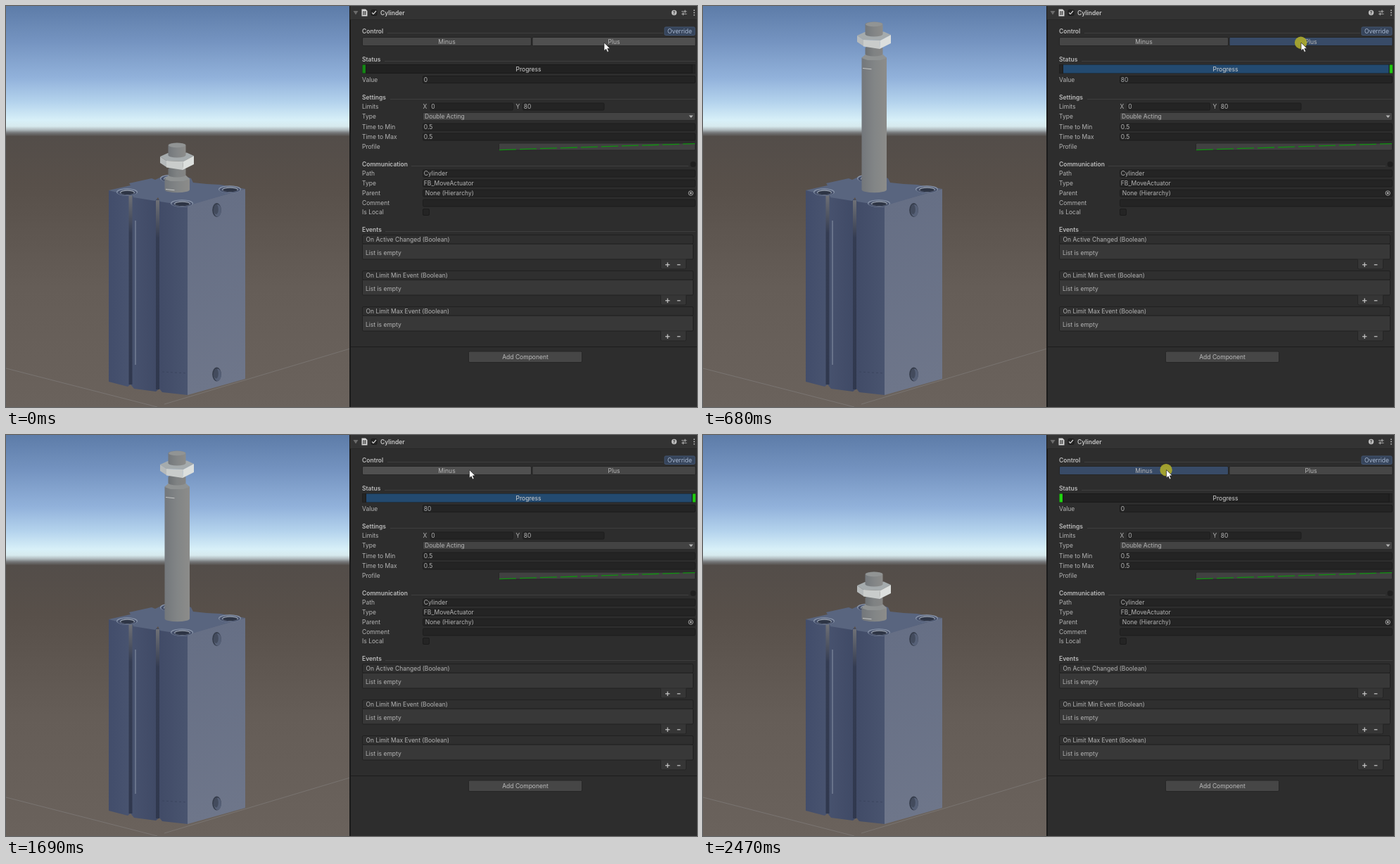
An HTML page with a canvas that plays this animation: 982x570 px, repeating every 2.54 s.

```html
<!DOCTYPE html>
<html lang="en">
<head>
<meta charset="utf-8">
<title>Cylinder inspector</title>
<style>
html, body { margin: 0; width: 100%; height: 100%; overflow: hidden; background: #2d2d2d; }
canvas { display: block; width: 982px; height: 570px; }
</style>
</head>
<body>
<canvas id="stage" width="982" height="570"></canvas>
<script>
const ctx = document.getElementById('stage').getContext('2d');
const LOOP = 2540;
const FONT = 'Inter, Roboto, sans-serif';
const UP = [0, 12.8, 22.4, 32, 44.8, 54.4, 64, 76.8, 80];
const DOWN = [76.8, 64, 54.39999, 44.79999, 31.99999, 22.39999, 12.79999, 0, 0];
const PX_PER_UNIT = 2.15;

// ---- helpers ----
function rect(x, y, w, h, fill) {
  ctx.fillStyle = fill;
  ctx.fillRect(x, y, w, h);
}

function box(x, y, w, h, fill, stroke, r = 1.5) {
  ctx.beginPath();
  ctx.roundRect(x + .5, y + .5, w - 1, h - 1, r);
  ctx.fillStyle = fill;
  ctx.fill();
  if (stroke) {
    ctx.strokeStyle = stroke;
    ctx.lineWidth = 1;
    ctx.stroke();
  }
}

function poly(points, fill) {
  ctx.beginPath();
  for (let i = 0; i < points.length; i += 2) ctx.lineTo(points[i], points[i + 1]);
  ctx.closePath();
  ctx.fillStyle = fill;
  ctx.fill();
}

function oval(x, y, rx, ry, fill) {
  ctx.beginPath();
  ctx.ellipse(x, y, rx, ry, 0, 0, 7);
  ctx.fillStyle = fill;
  ctx.fill();
}

function line(x1, y1, x2, y2, color, width = 1) {
  ctx.beginPath();
  ctx.moveTo(x1, y1);
  ctx.lineTo(x2, y2);
  ctx.strokeStyle = color;
  ctx.lineWidth = width;
  ctx.stroke();
}

function gradient(x1, y1, x2, y2, ...stops) {
  const g = ctx.createLinearGradient(x1, y1, x2, y2);
  for (const [at, color] of stops) g.addColorStop(at, color);
  return g;
}

function text(str, x, y, color = '#b4b4b4', align = 'left', weight = 400) {
  ctx.font = `${weight} 8.5px ${FONT}`;
  ctx.textAlign = align;
  ctx.fillStyle = color;
  ctx.fillText(str, x, y + 3.1);
}

// ---- 3D view ----
function drawBackdrop() {
  rect(0, 0, 489, 570, gradient(0, 0, 0, 570,
    [0, '#5d7ca8'], [.09, '#7594c1'], [.18, '#92b2db'], [.24, '#b4d3ed'],
    [.285, '#d8f0f8'], [.3, '#d7eaee'], [.309, '#aeb8bc'], [.316, '#76787a'], [.325, '#534d49'],
    [.45, '#58504a'], [.7, '#655d57'], [1, '#6a625c']));
  line(0, 515, 215, 570, 'rgba(170,175,180,.3)', .8);
  line(225, 566, 489, 487, 'rgba(170,175,180,.3)', .8);
}

function cornerHole(x, y, rx) {
  oval(x, y, rx, 5.2, '#8793a8');
  oval(x, y + .6, rx - 1.3, 4.4, '#46506a');
  oval(x + .5, y + .4, rx - 4.5, 3.5, '#a3acb8');
  oval(x + .5, y + 1, rx - 5.5, 2.8, '#2e3545');
}

function sideHole(y) {
  oval(299.5, y, 6.3, 10, '#363d4c');
  oval(300.6, y + .8, 5.2, 8.8, '#566077');
  oval(298.6, y - 1, 3.2, 7, '#434b5d');
}

function drawBlock() {
  poly([146, 262, 258, 283, 258, 553, 222, 549, 218, 544, 213, 548, 182, 544, 177, 538, 173, 541, 146, 534],
    gradient(146, 0, 258, 0, [0, '#424d6b'], [.25, '#48536f'], [.6, '#404a66'], [1, '#49546f']));
  poly([258, 283, 340, 260, 340, 530, 258, 553],
    gradient(258, 283, 340, 530, [0, '#666f85'], [1, '#6e768a']));
  poly([146, 262, 177, 255, 175, 252, 207, 245, 212, 247, 225, 241, 250, 240, 263, 245,
    266, 251, 285, 253, 304, 254, 340, 260, 258, 284, 219, 278, 216, 272, 212, 277,
    181, 272, 179, 266, 174, 269], '#59657f');

  for (const [x, y] of [[174.5, 269], [213, 276]]) {
    const bottom = y + 269;
    rect(x, y, 5, bottom - y, gradient(0, y, 0, bottom,
      [0, '#6e7076'], [.07, '#5a5e69'], [.2, '#343c52'], [1, '#30384e']));
  }
  line(184, 305, 184, 510, '#929cae', .9);
  ctx.setLineDash([3, 3]);
  line(222, 520, 257, 522, '#374159', .7);
  ctx.setLineDash([]);

  cornerHole(232, 245, 13);
  cornerHole(172, 264.5, 15);
  cornerHole(318, 260.5, 16);
  cornerHole(250, 280.5, 16);
  sideHole(290);
  sideHole(523.5);
}

function shaft(x1, x2, top, bottom, ry, shades) {
  const c = (x1 + x2) / 2, r = (x2 - x1) / 2;
  ctx.beginPath();
  ctx.moveTo(x1, top);
  ctx.lineTo(x1, bottom);
  ctx.ellipse(c, bottom, r, ry, 0, Math.PI, 0, true);
  ctx.lineTo(x2, top);
  ctx.ellipse(c, top, r, ry, 0, 0, Math.PI, true);
  ctx.fillStyle = gradient(x1, 0, x2, 0, [0, shades[0]], [.5, shades[1]], [1, shades[2]]);
  ctx.fill();
}

function drawRod(value) {
  const lift = -value * PX_PER_UNIT;
  const steel = ['#73777b', '#828586', '#8c8c8a'];
  shaft(225.5, 261, 246 + lift, 261, 4.3, steel);
  ctx.save();
  ctx.translate(0, lift);
  poly([225.5, 246, 231, 240.5, 255.5, 240.5, 261, 246, 252, 249, 234, 249], '#8f9292');
  shaft(230.5, 255.5, 232, 240, 3.4, ['#6c7073', '#7f8283', '#858584']);
  line(227, 260.5, 239.5, 261.8, '#c7c9c8', 1);

  poly([219, 214, 230, 209, 257, 208.5, 267, 213, 252, 221, 228, 220], '#a5abad');
  poly([219, 214, 228, 220, 228, 229, 219, 223], '#b6babb');
  poly([228, 220, 252, 221, 251, 233, 228, 229.5], '#c9cccb');
  poly([252, 221, 267, 213, 267, 225, 251, 233], '#dcdfdd');
  shaft(230.5, 255.5, 198, 212, 3.4, steel);
  oval(243, 198, 12, 3.2, '#919494');
  ctx.restore();
}

// ---- inspector ----
function field(x, y, w, value, color) {
  box(x, y - 5.5, w, 11, '#242424', '#1d1d1d');
  if (value !== undefined) text(value, x + 1.8, y, color);
}

function heading(label, y, lineStart, lineEnd = 980) {
  const lineY = Math.floor(y + 2.5) + .5;
  text(label, 506, y, '#bcbcbc', 'left', 600);
  line(lineStart, lineY, lineEnd, lineY, '#3e3e3e');
}

function button(x, w, label, hover, pressed) {
  box(x, 44, w, 13, pressed ? '#384b67' : hover ? '#505050' : '#464646', '#252525');
  text(label, x + w / 2, 50.5, '#b8b8b8', 'center');
}

function drawHeader() {
  rect(489, 0, 493, 19, '#333333');
  line(489, 19.5, 982, 19.5, '#272727');
  poly([493.5, 7, 500.5, 7, 497, 12.5], '#6b6b6b');
  poly([505.5, 4.5, 511, 4.5, 513.5, 7, 513.5, 14.5, 505.5, 14.5], '#d2d2d2');
  for (const d of [0, 2.5]) {
    line(508.3 + d, 7, 507.7 + d, 13, '#333', .8);
    line(507, 8.8 + d, 512, 8.8 + d, '#333', .8);
  }
  box(518.5, 5, 9, 9, '#242424', '#1a1a1a');
  line(520.2, 9.5, 522.2, 11.6, '#d5d5d5', 1.2);
  line(522, 11.6, 526, 7, '#d5d5d5', 1.2);
  text('Cylinder', 532, 9.5, '#c6c6c6', 'left', 600);

  oval(949.5, 9.5, 3.7, 3.7, '#bcbcbc');
  ctx.font = `700 6px ${FONT}`;
  ctx.textAlign = 'center';
  ctx.fillStyle = '#2d2d2d';
  ctx.fillText('?', 949.5, 11.7);
  line(960, 7.8, 967.5, 7.8, '#b5b5b5', .9);
  line(960, 11.3, 967.5, 11.3, '#b5b5b5', .9);
  line(965, 5.8, 965, 9.8, '#b5b5b5', 1.1);
  line(962.3, 9.3, 962.3, 13.3, '#b5b5b5', 1.1);
  for (const y of [6.2, 9.5, 12.8]) oval(978, y, .9, .9, '#bcbcbc');
}

function drawProgress(bar, dim) {
  box(506, 83, 474, 13, '#212121', '#1a1a1a', 0);
  rect(506.5, 83.5, 4.5, 12, bar === 0 ? (dim ? '#148614' : '#20d410') : '#242424');
  rect(975.5, 83.5, 4.5, 12, bar === 80 ? '#20c810' : '#242424');
  rect(512, 83.5, 463 * bar / 80, 12, '#234a70');
  line(511.5, 83, 511.5, 96, '#1a1a1a');
  line(975, 83, 975, 96, '#1a1a1a');
  text('Progress', 742.5, 89.5, '#d2d2d2', 'center');
}

function drawSettings() {
  heading('Settings', 129.5, 546);
  const labels = [['Limits', 143], ['Type', 157], ['Time to Min', 172], ['Time to Max', 186], ['Profile', 200]];
  for (const [label, y] of labels) text(label, 506, y);
  text('X', 592.5, 143);
  field(602.5, 143, 118.5, '0');
  text('Y', 724.5, 143);
  field(734, 143, 116.5, '80');
  box(592, 151, 388, 12, '#434343', '#292929');
  text('Double Acting', 595, 157);
  poly([970.5, 155.5, 976.5, 155.5, 973.5, 159], '#b8b8b8');
  field(592, 172, 388, '0.5');
  field(592, 186, 388, '0.5');
  box(700, 194.5, 280, 11, '#414141', '#262626');
  ctx.setLineDash([24, 5]);
  line(701, 204.6, 979, 195.6, '#0f920f', 1.3);
  ctx.setLineDash([]);
}

function drawCommunication() {
  heading('Communication', 224.5, 576, 970);
  oval(976.5, 225, 4, 4, '#1f1f1f');
  const labels = [['Path', 238], ['Type', 252], ['Parent', 266], ['Comment', 280], ['Is Local', 293]];
  for (const [label, y] of labels) text(label, 506, y);
  field(592, 238, 388, 'Cylinder');
  field(592, 252, 388, 'FB_MoveActuator');
  field(592, 266, 388);
  text('None (Hierarchy)', 595.8, 266);
  ctx.beginPath();
  ctx.arc(973.2, 266, 3.2, 0, 7);
  ctx.strokeStyle = '#b0b0b0';
  ctx.lineWidth = .9;
  ctx.stroke();
  oval(973.2, 266, 1.4, 1.4, '#b0b0b0');
  field(592, 280, 388);
  box(592, 288, 10, 10, '#242424', '#1b1b1b');
}

function drawEvent(label, y) {
  box(930, y + 27, 37, 16, '#363636', '#252525', 2);
  box(506, y + 6, 471, 23, '#383838', '#202020');
  box(506, y - 6.5, 471, 13.5, '#2f2f2f', '#202020');
  rect(930.5, y + 28, 36, 1.2, '#363636');
  text(label, 511.5, y);
  text('List is empty', 511, y + 19);
  line(937, y + 36.3, 943.4, y + 36.3, '#c8c8c8', 1.2);
  line(940.2, y + 33.1, 940.2, y + 39.5, '#c8c8c8', 1.2);
  line(953.8, y + 36.3, 958.4, y + 36.3, '#c8c8c8', 1.2);
}

function drawInspector(s) {
  rect(489, 0, 493, 570, '#2d2d2d');
  rect(488, 0, 2, 570, '#1b1b1b');
  drawHeader();

  heading('Control', 35.5, 542, 934);
  box(935.5, 29.5, 44, 12.5, '#36445a', '#435674');
  text('Override', 957.5, 35.5, '#a9b9d2', 'center');
  const overPlus = s.cursor.x > 747;
  button(506, 241, 'Minus', !overPlus, s.press === 'minus');
  button(747.5, 233, 'Plus', overPlus, s.press === 'plus');

  heading('Status', 76, 538);
  drawProgress(s.bar, s.dim);
  text('Value', 506, 104.5);
  field(592, 104.5, 388, String(s.value), s.value ? '#a6a8aa' : '#b8b8b8');

  drawSettings();
  drawCommunication();

  heading('Events', 318, 539);
  ['Active Changed', 'Limit Min Event', 'Limit Max Event'].forEach((name, i) =>
    drawEvent(`On ${name} (Boolean)`, 331.5 + 51 * i));

  line(489, 484.5, 982, 484.5, '#1c1c1c');
  box(657, 490.5, 162, 16.5, '#464646', '#262626');
  text('Add Component', 738, 498.5, '#bcbcbc', 'center');
}

function drawCursor({ x, y }, pressed) {
  if (pressed) oval(x - .4, y + .2, 8.7, 8.7, 'rgba(170,168,45,.92)');
  ctx.save();
  ctx.translate(x, y);
  ctx.lineJoin = 'round';
  poly([0, 0, 0, 11.6, 2.7, 9.2, 4.6, 13.4, 6.6, 12.5, 4.8, 8.4, 8.3, 8.2], '#fff');
  ctx.strokeStyle = '#222';
  ctx.lineWidth = .7;
  ctx.stroke();
  ctx.restore();
}

// ---- timeline ----
function stateAt(t) {
  let value = 0, bar = 0;
  if (t >= 1910) {
    const k = Math.min(8, Math.floor((t - 1910) / 70));
    value = DOWN[k];
    bar = k ? DOWN[k - 1] : 80;
  } else if (t >= 130) {
    const k = Math.min(8, Math.floor((t - 130) / 67.8));
    value = UP[k];
    bar = k === 8 ? 80 : UP[Math.max(0, k - 1)];
  }
  const step = t < 1280 ? 0 : Math.min(7, Math.floor((t - 1280) / 68.3) + 1);
  const p = step / 7;
  const ease = p * p * (3 - 2 * p);
  return {
    value, bar,
    dim: t < 1000,
    press: t >= 1910 ? 'minus' : t >= 130 && t < 1080 ? 'plus' : '',
    cursor: { x: 850 - 191.5 * ease, y: 52 - 2.5 * ease + 3 * Math.sin(Math.PI * p) }
  };
}

const start = performance.now();

function frame() {
  const s = stateAt((performance.now() - start) % LOOP);
  drawBackdrop();
  drawBlock();
  drawRod(s.value);
  drawInspector(s);
  drawCursor(s.cursor, s.press);
  requestAnimationFrame(frame);
}
frame();
</script>
</body>
</html>
```
